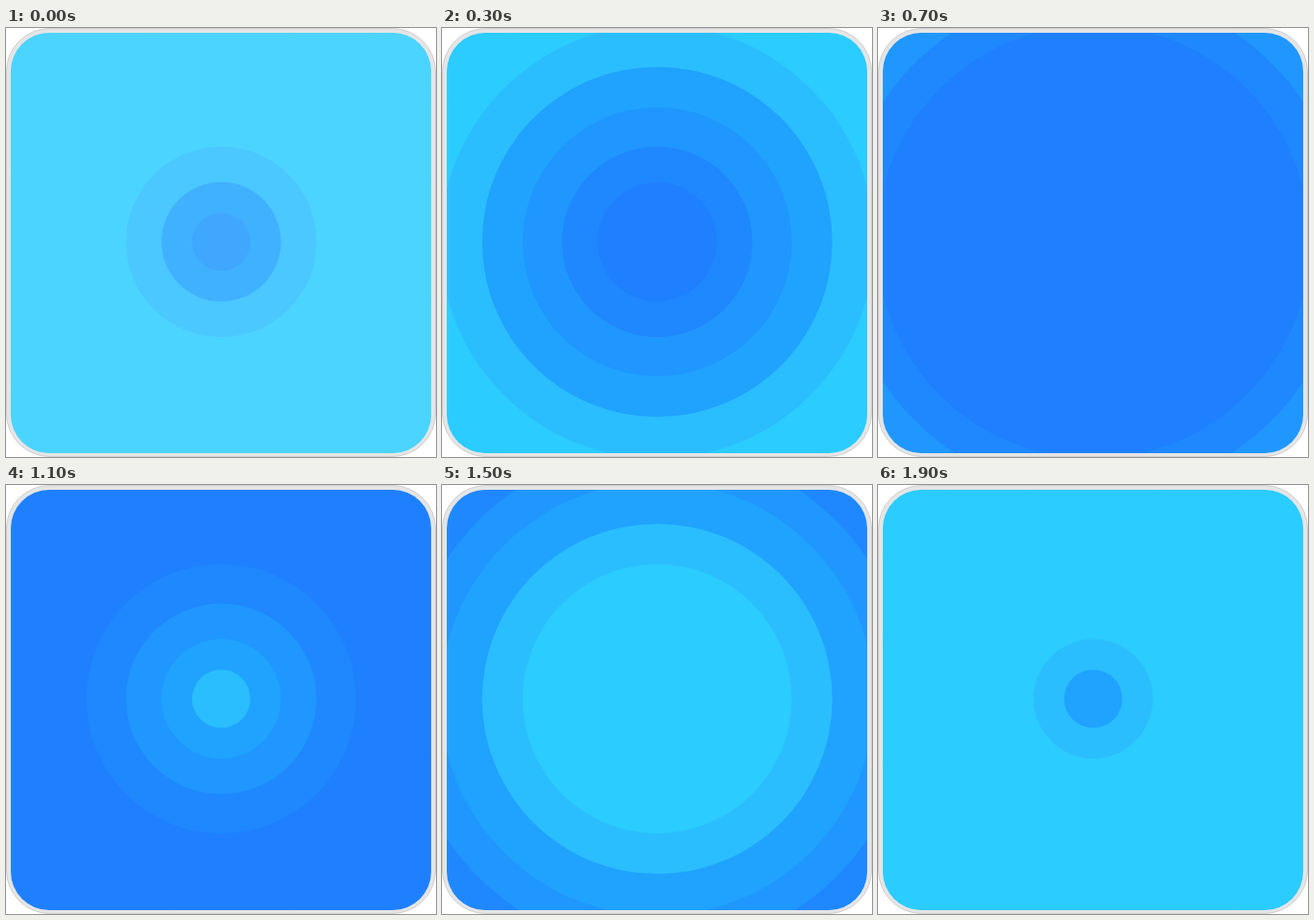
An HTML page for the animation above (2 s loop, 448 by 447 pixels).

```html
<!DOCTYPE html>
<html lang="en">
<head>
<meta charset="utf-8">
<title>Ripple tile</title>
<style>
  html, body { margin: 0; width: 100%; height: 100%; overflow: hidden; background: #fff; }
  svg { display: block; width: 448px; height: 447px; }
</style>
</head>
<body>
<svg viewBox="0 0 448 447">
  <clipPath id="tile"><rect x="5" y="5" width="438" height="438" rx="40"/></clipPath>
  <rect x=".5" y=".5" width="447" height="446" rx="45" fill="#e5e5e5" stroke="#cfcfcf"/>
  <g id="rings" clip-path="url(#tile)"></g>
  <rect id="glow" x="5" y="5" width="438" height="438" rx="40" fill="#fff" opacity=".15"/>
</svg>
<script>
const LOOP = 2000, STEP = 100;
const shades = ['#2bccff', '#2bbeff', '#1fa3ff', '#1f97ff', '#1f88ff', '#1f80ff'];
const radii = [30.3, 62.2, 99.2, 140.2, 182.4, 226, 263, 400];
const glow = document.getElementById('glow');
const group = document.getElementById('rings');

const rings = radii.map(radius => {
  const ring = document.createElementNS('http://www.w3.org/2000/svg', 'circle');
  ring.setAttribute('cx', 224.2);
  ring.setAttribute('cy', 222.8);
  ring.setAttribute('r', radius);
  group.prepend(ring);
  return ring;
});

// How far a wave front, launched `age` steps ago, has shaded a ring.
const depth = (age, ring) => Math.max(0, Math.min(5, age - ring));

function draw(now) {
  const step = Math.floor((now % LOOP) / STEP);
  // A dark wave starts at step 17 of the previous loop, a light one at step 7.
  rings.forEach((ring, i) => {
    const shade = depth(step + 3, i) - depth(step - 7, i) + depth(step - 17, i);
    ring.setAttribute('fill', shades[shade]);
  });
  glow.style.display = step === 0 ? '' : 'none';
}

const start = performance.now();
function tick() {
  draw(performance.now() - start);
  requestAnimationFrame(tick);
}
tick();
</script>
</body>
</html>
```
